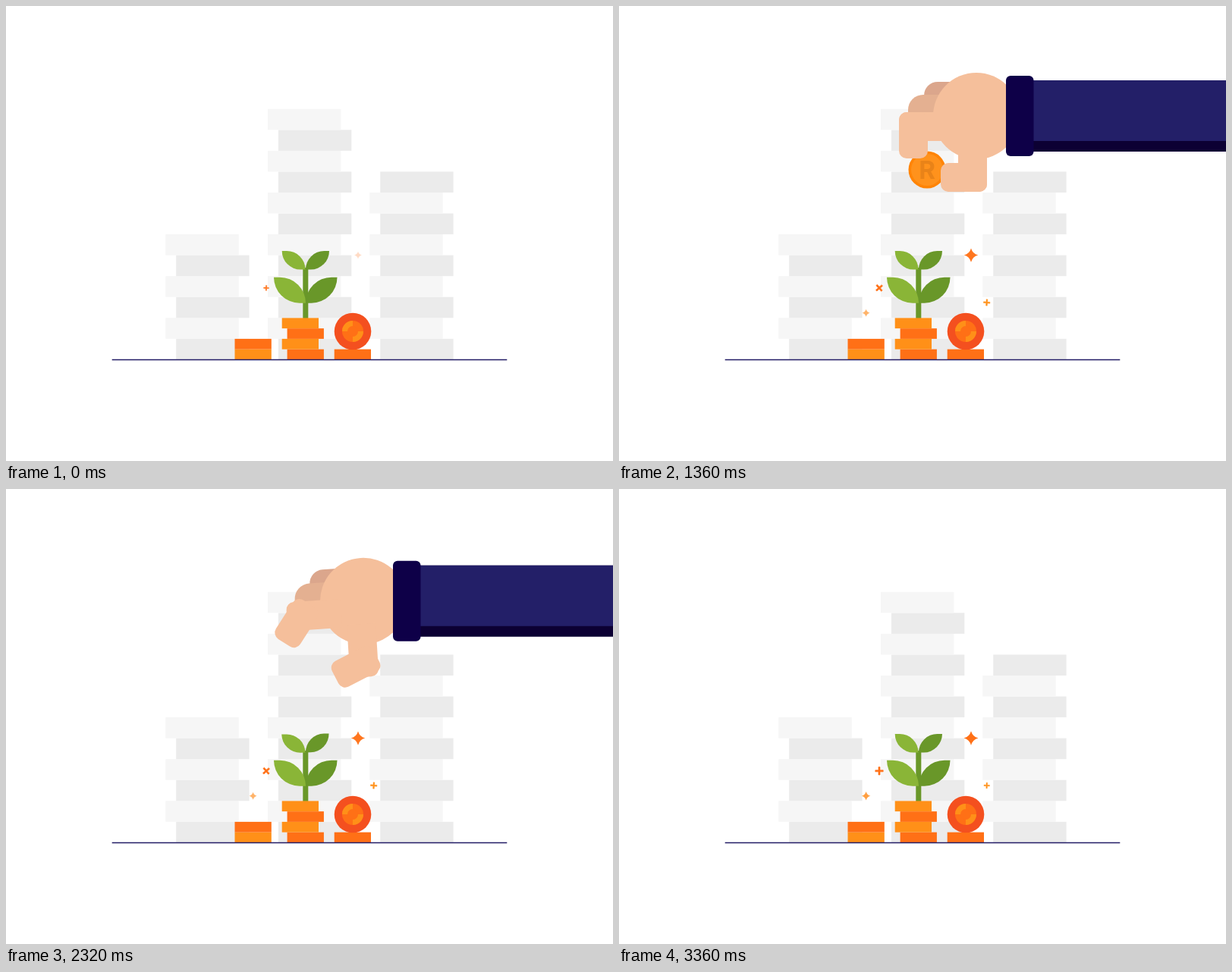
Animation, 800 px wide and 600 px high, one loop 3400 ms. Source, as an HTML page:

```html
<!DOCTYPE html>
<html lang="en">
<head>
<meta charset="utf-8">
<title>Growing savings</title>
<style>
  html, body { margin: 0; width: 100%; height: 100%; overflow: hidden; background: #fff; }
  svg { display: block; width: 800px; height: 600px; }
  .letter { font: 700 33px Inter, Arial, sans-serif; text-anchor: middle; fill: #e98318; }
  .skin { fill: #f5bf9b; }
  .light { fill: #8ab537; }
  .dark { fill: #699729; }
  .amber { fill: #ff9018; }
  .orange { fill: #ff7016; }
</style>
</head>
<body>
<svg viewBox="0 0 800 600">
  <defs>
    <clipPath id="aboveStack"><rect width="800" height="411.5"/></clipPath>
    <g id="coin">
      <circle r="24.5" fill="#ff8405"/>
      <circle r="21" fill="#ff921c"/>
      <text class="letter" y="12">R</text>
    </g>
    <path id="star" d="M0-10Q2.2-2.2 10 0Q2.2 2.2 0 10Q-2.2 2.2-10 0Q-2.2-2.2 0-10Z"/>
    <path id="plus" d="M-2-10H2V-2H10V2H2V10H-2V2H-10V-2H-2Z" stroke-width="1.2" stroke="currentColor"/>
  </defs>

  <g id="piles"></g>
  <g clip-path="url(#aboveStack)"><use id="drop" href="#coin"/></g>

  <g id="plant">
    <rect class="dark" x="391.3" y="345" width="7" height="67"/>
    <path class="light" d="M353 357.7H361A34 34 0 0 1 395 391.7H387A34 34 0 0 1 353 357.7Z"/>
    <path class="dark" d="M436.5 357.7H429A34 34 0 0 0 395 391.7H402.5A34 34 0 0 0 436.5 357.7Z"/>
    <g id="tops">
      <path class="light" d="M363.7 323H370A24.5 24.5 0 0 1 394.5 347.5H388.2A24.5 24.5 0 0 1 363.7 323Z"/>
      <path class="dark" d="M426 323H419.5A24.5 24.5 0 0 0 395 347.5H401.5A24.5 24.5 0 0 0 426 323Z"/>
    </g>
  </g>

  <g id="coins"></g>
  <circle cx="457" cy="429" r="24.3" fill="#f4501f"/>
  <circle class="orange" cx="457" cy="429" r="14"/>
  <path class="amber" d="M457 429V415A14 14 0 0 0 443 429ZM457 429V443A14 14 0 0 0 471 429Z"/>
  <circle class="orange" cx="457" cy="429" r="7"/>
  <path d="M139.7 466.4H660.3" stroke="#231c66" stroke-width="1.5"/>

  <use id="starA" href="#star" fill="#ff7016"/>
  <use id="starB" href="#star" fill="#ff8a18"/>
  <use id="plusA" href="#plus" fill="#ff7016" color="#ff7016"/>
  <use id="plusB" href="#plus" fill="#ff921c" color="#ff921c"/>

  <!-- the arm is drawn around the centre of the palm -->
  <g id="arm">
    <rect x="60" y="-47" width="640" height="94" fill="#0c0033"/>
    <rect x="60" y="-47" width="640" height="80" fill="#231f68"/>
    <g id="hand">
      <path fill="#dba68c" d="M-69-20V-27A18 18 0 0 1-51-45H-10V-20Z"/>
      <path fill="#e4b091" d="M-90 4V-8A20 20 0 0 1-70-28H-20V4Z"/>
      <use id="held" href="#coin" x="-65" y="71"/>
      <circle class="skin" r="57"/>
      <path class="skin" d="M-92-5H-30V33H-92A10 10 0 0 1-102 23V5A10 10 0 0 1-92-5Z"/>
      <rect id="indexTip" class="skin" x="-102" y="-5" width="38" height="61" rx="10"/>
      <g id="thumb">
        <path class="skin" d="M-24 30H14V90A10 10 0 0 1 4 100H-14A10 10 0 0 1-24 90Z"/>
        <rect id="thumbTip" class="skin" x="-47" y="62" width="61" height="38" rx="10"/>
      </g>
    </g>
    <rect x="39" y="-53" width="36.5" height="106" rx="6" fill="#0e0048"/>
  </g>
</svg>

<script>
const LOOP = 3400, STEP = 40, PULSE = 960, RELEASE = 1760;
const $ = id => document.getElementById(id);

function bar(parent, x, y, w, h, fill) {
  const r = document.createElementNS('http://www.w3.org/2000/svg', 'rect');
  const attrs = { x, y, width: w, height: h, fill };
  for (const k in attrs) r.setAttribute(k, attrs[k]);
  parent.append(r);
}

// Grey piles: left edge and number of slabs, counted up from the ground
for (const [x, count] of [[210.3, 6], [345, 12], [479.3, 9]])
  for (let i = 0; i < count; i++) {
    const dark = i % 2 === 0;
    bar($('piles'), x + (dark ? 13.9 : 0), 466.4 - 27.55 * (i + 1), 96.4, 27.55, dark ? '#ebebeb' : '#f6f6f6');
  }

// Small coin slabs: left edge, level, colour
const AMBER = '#ff9018', ORANGE = '#ff7016';
for (const [x, level, fill] of [
  [301.5, 0, AMBER], [301.5, 1, ORANGE],
  [370.6, 0, ORANGE], [363.7, 1, AMBER], [370.6, 2, ORANGE], [363.7, 3, AMBER],
  [432.7, 0, ORANGE]
]) bar($('coins'), x, 466.4 - 13.75 * (level + 1), 48.3, 13.75, fill);

// Each track is a list of [time, value]
const tracks = {
  x: [[0, 980], [160, 765], [400, 551], [640, 467], [800, 469], [1360, 471],
      [2480, 471], [2680, 467], [2960, 680], [3200, 990], [3400, 990]],
  tilt: [[0, -4], [240, -3.8], [400, -2.3], [560, 1.6], [700, 2.7], [760, 2.6], [1280, 0]],
  lift: [[1400, 0], [1720, -5], [2040, 15], [2400, 1]],
  turn: [[0, -11], [240, -10.5], [400, -8.5], [720, 13], [1280, 0], [1480, 0],
         [1760, 9.6], [2040, -13], [2480, 0]],
  indexTip: [[1760, 0], [2040, 26], [2440, 38]],
  thumb: [[1760, 0], [2040, -4], [2440, 1.5]],
  thumbTip: [[1760, 0], [2040, -21], [2440, -24]]
};

// Monotone cubic through the keys, flat at the turning points
function at(keys, t) {
  const last = keys.length - 1;
  if (t <= keys[0][0]) return keys[0][1];
  if (t >= keys[last][0]) return keys[last][1];
  const i = keys.findIndex(k => k[0] > t) - 1;
  const secant = n => (keys[n + 1][1] - keys[n][1]) / (keys[n + 1][0] - keys[n][0]);
  const slope = n => {
    if (n === 0 || n === last) return 0;
    const a = secant(n - 1), b = secant(n);
    return a * b > 0 ? 2 * a * b / (a + b) : 0;
  };
  const [t0, v0] = keys[i], [t1, v1] = keys[i + 1];
  const d = t1 - t0, u = (t - t0) / d, w = 1 - u;
  return v0 * (1 + 2 * u) * w * w + slope(i) * d * u * w * w
       + v1 * u * u * (3 - 2 * u) - slope(i + 1) * d * u * u * w;
}

const place = (id, value) => $(id).setAttribute('transform', value);
const show = (id, on) => $(id).setAttribute('visibility', on ? 'visible' : 'hidden');

// Distance in ms to the nearest peak of a pulse
const fromPeak = (t, peak) => {
  const p = (((t - peak) % PULSE) + PULSE) % PULSE;
  return Math.min(p, PULSE - p);
};
const glow = (t, peak) => 0.5 + 0.5 * Math.cos(fromPeak(t, peak) / PULSE * 2 * Math.PI);

function star(id, x, y, e, size, grow, faint) {
  place(id, `translate(${x} ${y}) scale(${(size + grow * e) / 10})`);
  $(id).setAttribute('opacity', faint + (1 - faint) * e);
}

function plus(id, x, y, t, peak, size, grow) {
  const spin = 90 * Math.exp(-fromPeak(t, peak) / 130);
  const e = Math.pow(glow(t, peak), 0.6);
  place(id, `translate(${x} ${y}) rotate(${spin}) scale(${(size + grow * e) / 10})`);
}

function draw(t) {
  const v = {};
  for (const k in tracks) v[k] = at(tracks[k], t);

  place('arm', `translate(${v.x} ${145 + v.lift - 4.5 * v.tilt}) rotate(${v.tilt})`);
  place('hand', `rotate(${v.turn - v.tilt})`);
  place('indexTip', `rotate(${v.indexTip} -83 14)`);
  place('thumb', `rotate(${v.thumb} -5 40)`);
  place('thumbTip', `rotate(${v.thumbTip} -5 81)`);

  const fall = (t - RELEASE) / 280;
  show('held', fall <= 0);
  show('drop', fall > 0 && fall < 1.3);
  place('drop', `translate(395 ${199 + 178 * fall * fall})`);

  const s = t - 1960;
  const sway = s > 0 ? 5.5 * Math.sin(s / 80) * Math.exp(-s / 200) : 0;
  place('tops', `rotate(${sway * 1.25} 395 347.5)`);

  star('starA', 464, 328.6, Math.pow(glow(t, 480), 0.75), 4.8, 4.6, 0.25);
  star('starB', 325.6, 404.8, glow(t, 640), 3.4, 3.1, 0.3);
  show('starB', t >= 160);
  plus('plusA', 343, 371.8, t, 480, 3.4, 1.8);
  plus('plusB', 484.7, 391, t, 0, 3.7, 2.5);
  show('plusB', t >= 480);
}

const start = performance.now();
function frame() {
  const t = Math.max(0, performance.now() - start) % LOOP;
  draw(Math.floor(t / STEP) * STEP);
  requestAnimationFrame(frame);
}
frame();
</script>
</body>
</html>
```
